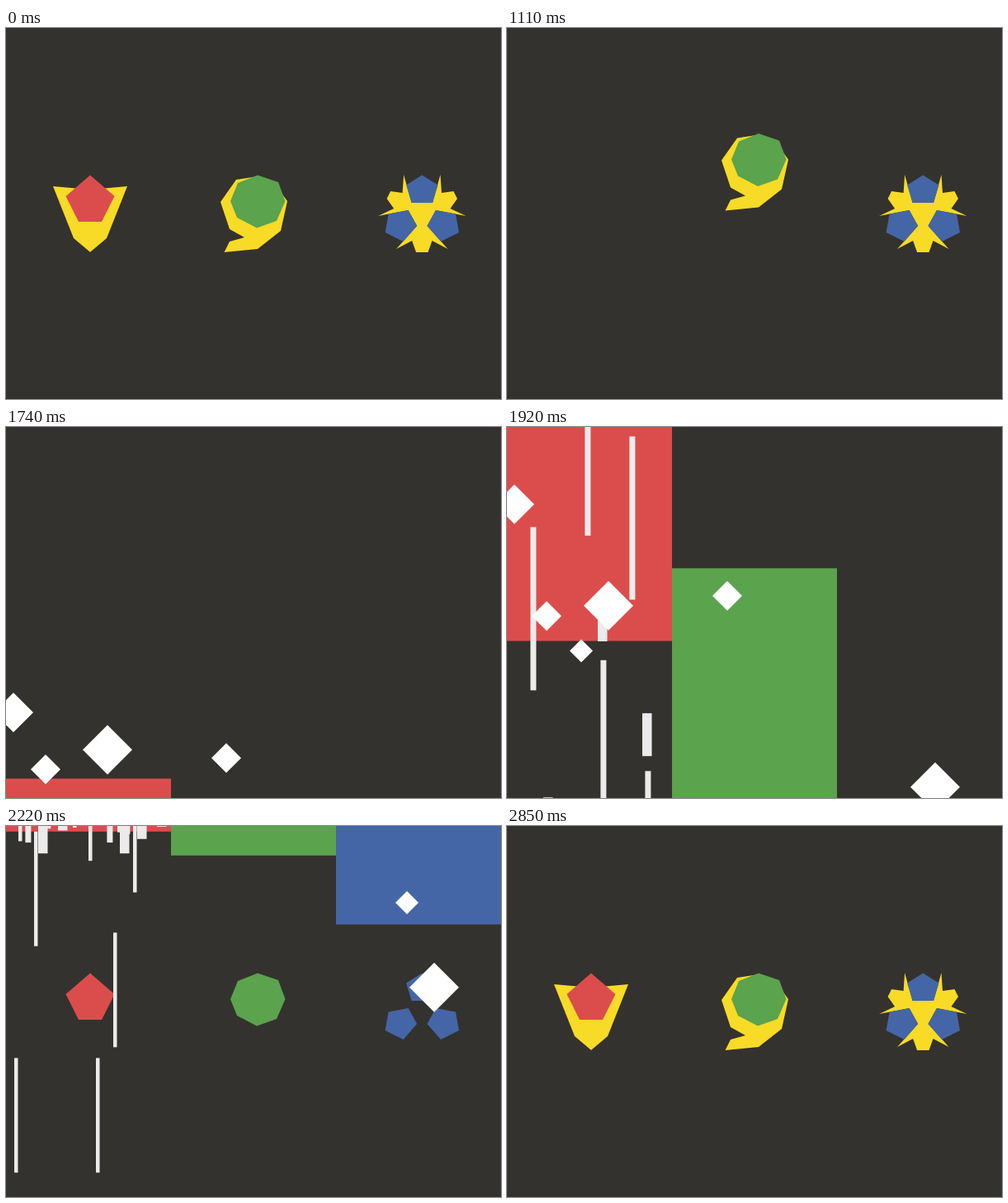
Recreate the animation shown at these times as an HTML page with a canvas. Size 600 by 450 pixels, loop 3.6 s.

```html
<!DOCTYPE html>
<html lang="en">
<head>
<meta charset="utf-8">
<title>Three stones</title>
<style>
  html, body { margin: 0; width: 100%; height: 100%; overflow: hidden; background: #34322e; }
  canvas { display: block; }
</style>
</head>
<body>
<canvas id="stage" width="600" height="450"></canvas>
<script>
const W = 600, H = 450, LOOP = 3600, COLUMN = W / 3;
const BACKGROUND = '#34322e', YELLOW = '#f7db26', LINE = '#ebebeb';
const ctx = document.getElementById('stage').getContext('2d');

const shape = (...outlines) => new Path2D(outlines.map(points => `M${points}Z`).join(''));

function reflect(axis, points) {
  return points.split(' ').map(point => {
    const [x, y] = point.split(',');
    return `${2 * axis - x},${y}`;
  }).reverse().join(' ');
}

const symmetric = (axis, half) => `${half} ${reflect(axis, half)}`;

const RED_AXIS = 102, BLUE_AXIS = 504.3;
const BLUE_LOBE = '521,221 545,225.5 549,248 527,259 510.5,240';

// lineOrder: turn in which each line of a trio sets off.
const columns = [
  {
    color: '#db4d4c',
    gem: shape(symmetric(RED_AXIS, '102,178.5 131.5,204 116,235')),
    setting: shape(symmetric(RED_AXIS, '102,196 147,192 122,255 101.8,272')),
    lineX: [15, 81, 135], lineOrder: [2, 0, 1]
  },
  {
    color: '#5ba34d',
    gem: shape('305,178.5 330,187 338.5,210 328,234 304,242.5 280,230 272,210 281,188'),
    setting: shape('305,180 279,184 260,211 271,244 289,254 271,259 264.5,272 305,268 333,246 341,210 330,195'),
    lineX: [34, 100, 154], lineOrder: [2, 0, 1]
  },
  {
    color: '#4466a6',
    gem: shape(symmetric(BLUE_AXIS, '504.3,178.5 523.5,190.5 517,212'),
      BLUE_LOBE, reflect(BLUE_AXIS, BLUE_LOBE)),
    setting: shape(symmetric(BLUE_AXIS, '517,212 526.5,178 528,200 542.5,198 547,207 538.5,219 ' +
      '557.5,228 521,221 510.5,240 535.5,268 516.5,258 511.5,272')),
    lineX: [10, 109, 130], lineOrder: [1, 1, 0]
  }
];

const lineStyles = [
  { width: 4.5, length: 139, shift: 0, start: 1978, pace: 37 },
  { width: 7, length: 198, shift: 13.4, start: 1789, pace: 45 },
  { width: 11.5, length: 52, shift: 29, start: 1863, pace: 36 }
];

const diamonds = [
  { x: 9, r: 24, enter: 1650, travel: 355 },
  { x: 48, r: 18, enter: 1690, travel: 470 },
  { x: 123, r: 30, enter: 1650, travel: 525 },
  { x: 90, r: 14, enter: 1770, travel: 375 },
  { x: 267, r: 18, enter: 1680, travel: 445 },
  { x: 519, r: 30, enter: 1867, travel: 635 },
  { x: 486, r: 14, enter: 1930, travel: 375 }
];

// Falls from 1 to 0: quick start, long soft end.
function settle(elapsed, pace) {
  const z = Math.max(0, elapsed) / pace;
  return Math.max(0, ((1 + z) * Math.exp(-z) - 0.0075) / 0.9925);
}

function rect(color, x, y, w, h) {
  ctx.fillStyle = color;
  ctx.fillRect(x, y, w, h);
}

function fill(color, path) {
  ctx.fillStyle = color;
  ctx.fill(path);
}

function fillFrom(left, top, color, path) {
  ctx.save();
  ctx.beginPath();
  ctx.rect(left, top, W * 2, H * 2);
  ctx.clip();
  fill(color, path);
  ctx.restore();
}

function drawDeparture(t) {
  columns.forEach(({ color, gem, setting }, i) => {
    const elapsed = Math.max(0, t - 858 - 152.5 * i);
    ctx.save();
    ctx.translate(0, -H * (elapsed / 300) ** 2);
    fill(YELLOW, setting);
    fill(color, gem);
    ctx.restore();
  });
}

// The yellow band uncovers the settings.
function drawBand(t) {
  const left = 2 * W * settle(t - 2226, 89) - W;
  for (const { setting } of columns) fillFrom(left, 0, YELLOW, setting);
  rect(YELLOW, left, 163.5, W, 123.5);
}

// The coloured bars uncover the gems.
function drawBars(t) {
  columns.forEach(({ color, gem }, i) => {
    const top = 2 * H * settle(t - 1721 - 109.5 * i, 81) - H;
    rect(color, i * COLUMN, top, COLUMN, H);
    fillFrom(0, top, color, gem);
  });
}

function drawLines(t) {
  columns.forEach(({ lineX, lineOrder }, i) => {
    for (const { width, length, shift, start, pace } of lineStyles)
      lineX.forEach((x, j) => {
        const elapsed = t - start - 88 * i - 28 * lineOrder[j];
        const bottom = (H + length) * settle(elapsed, pace);
        rect(LINE, x + shift, bottom - length, width, length);
      });
  });
}

function drawDiamonds(t) {
  for (const { x, r, enter, travel } of diamonds) {
    const y = H + r - (H + 2 * r) * (t - enter) / travel;
    fill('#fff', shape(`${x},${y - r} ${x + r},${y} ${x},${y + r} ${x - r},${y}`));
  }
}

function draw(t) {
  rect(BACKGROUND, 0, 0, W, H);
  if (t < 1600) return drawDeparture(t);
  drawBand(t);
  drawBars(t);
  drawLines(t);
  drawDiamonds(t);
}

function tick() {
  draw(performance.now() % LOOP);
  requestAnimationFrame(tick);
}
tick();
</script>
</body>
</html>
```
